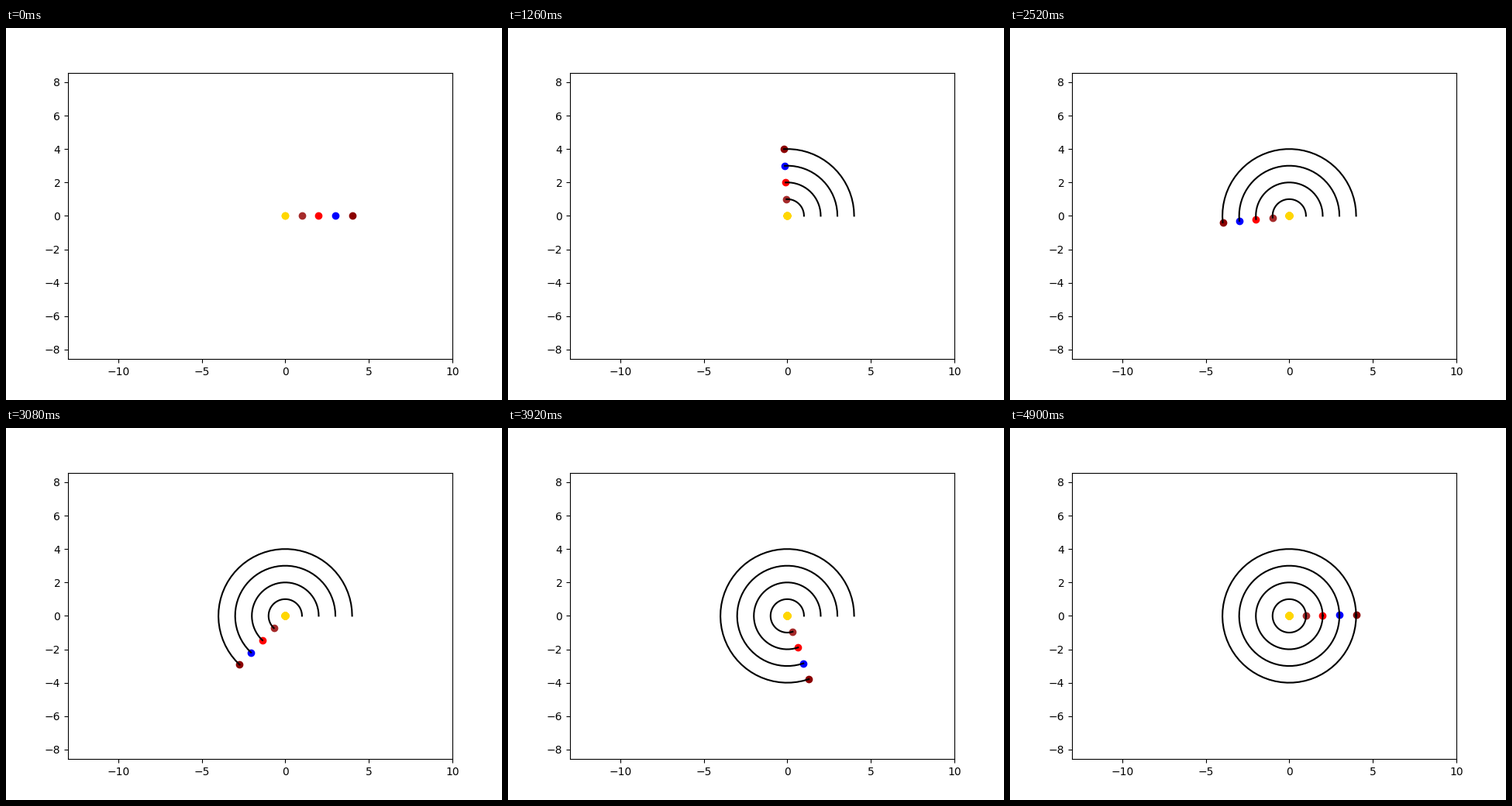
Animation of 640x480 px, one loop 4.97 s. Source, as a matplotlib script:

```python
import matplotlib.pyplot as plt
import numpy as np
from matplotlib.animation import FuncAnimation

FRAMES = 71
INTERVAL = 70  # ms
STEP = 0.09    # radians per frame
ORBITS = [(1, "brown"), (2, "red"), (3, "blue"), (4, "darkred")]

fig, ax = plt.subplots(figsize=(6.4, 4.8), dpi=100)
ax.set_aspect("equal")
ax.set_xlim(-13, 10)
half_height = 23 * 369.6 / 496 / 2
ax.set_ylim(-half_height, half_height)

sun, = ax.plot([], [], "o", color="gold")
planets = [ax.plot([], [], "o", color=color)[0] for _, color in ORBITS]
trails = [ax.plot([], [], color="black", zorder=3)[0] for _ in ORBITS]


def update(frame):
    angles = STEP * np.arange(frame + 1)
    # The sun is stamped once more each frame, which hardens its edge.
    stamps = np.zeros(frame + 2)
    sun.set_data(stamps, stamps)
    for (radius, _), planet, trail in zip(ORBITS, planets, trails):
        x, y = radius * np.cos(angles), radius * np.sin(angles)
        planet.set_data(x[-1:], y[-1:])
        trail.set_data(x, y)
    return [sun, *planets, *trails]


anim = FuncAnimation(fig, update, frames=FRAMES, interval=INTERVAL,
                     repeat=True, repeat_delay=0, blit=False)
plt.show()
```
